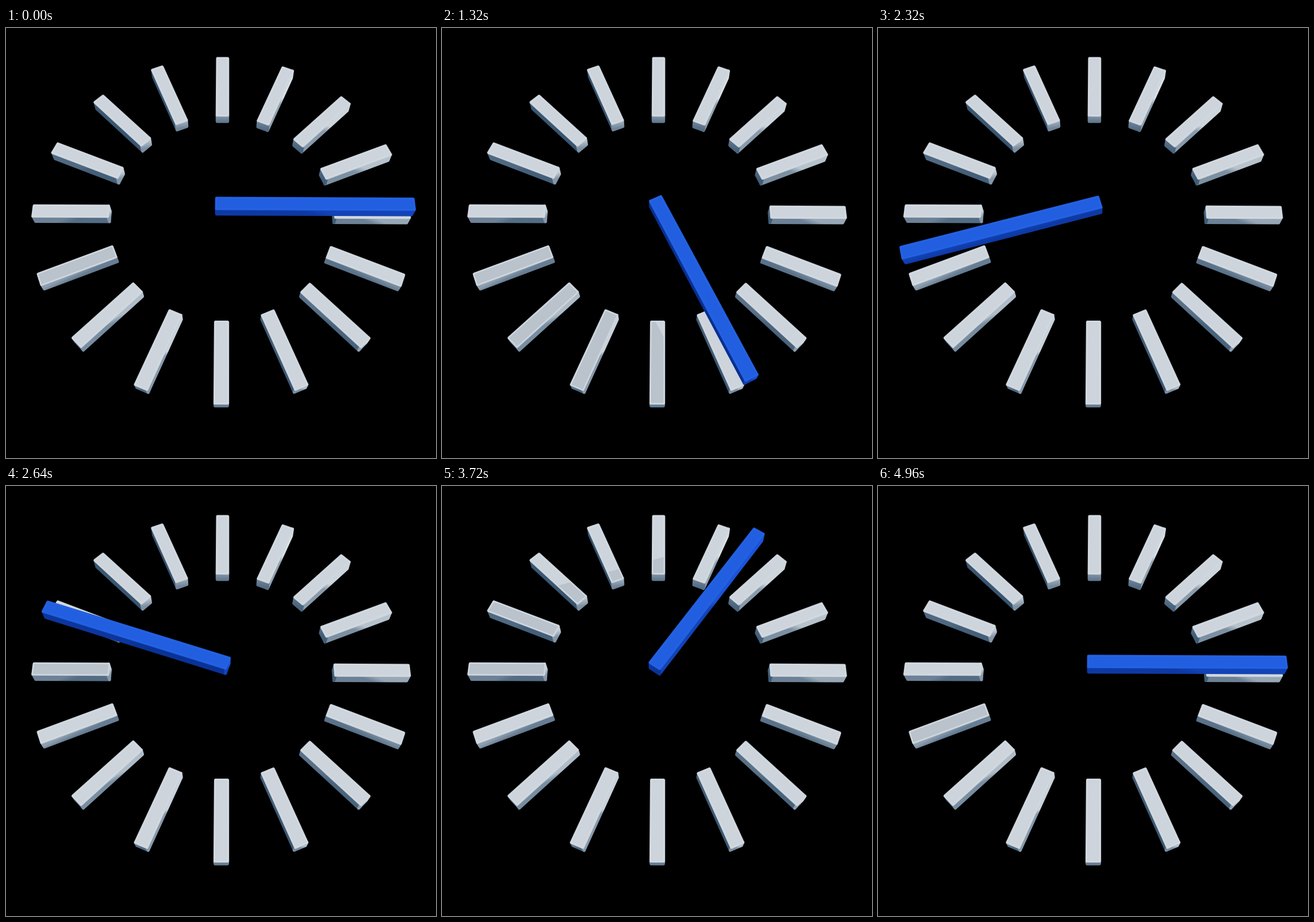
Write an HTML page with a canvas that moves like this. It is 748 px wide and 748 px high and loops after 5000 ms.

```html
<!DOCTYPE html>
<html>
<head>
<meta charset="utf-8">
<style>
  html, body { margin: 0; background: #000; overflow: hidden; }
  canvas { display: block; }
</style>
</head>
<body>
<canvas id="stage" width="748" height="748"></canvas>
<script>
const ctx = document.getElementById('stage').getContext('2d');
const LOOP = 5000, STEP = 40, HALF_WIDTH = 12.4, BEVEL = 2.5, ROLL = 0.004;
const WHITE = { top: [205, 212, 219], dark: [54, 83, 111], light: [217, 224, 230], edge: 'rgba(226,232,238,.45)' };
const BLUE = { top: [33, 95, 224], dark: [8, 46, 142], light: [29, 88, 224], edge: 'rgba(60,115,240,.3)' };

// Tilted perspective camera; z = 0 is the top of the dial bars, z = -1 the floor.
function project([x, y, z]) {
  const depth = 1 + 0.00034 * y + 0.000014 * x - 0.0155 * z;
  const sx = x / depth, sy = -(0.907 * y + 9.5 * z) / depth;
  return [375.8 + sx - sy * ROLL, 319.5 + sy + sx * ROLL];
}

const rgb = c => `rgb(${c.map(Math.round)})`;
const mix = (a, b, t) => a.map((v, i) => v + (b[i] - v) * t);
const middle = (a, b) => [(a[0] + b[0]) / 2, (a[1] + b[1]) / 2];

function trace(points) {
  ctx.beginPath();
  points.forEach(p => ctx.lineTo(...p));
  ctx.closePath();
}

function paint(points, style) {
  trace(points);
  ctx.fillStyle = ctx.strokeStyle = style;
  ctx.lineWidth = 2 * BEVEL;
  ctx.fill();
  ctx.stroke();
}

function area([a, b, c]) {
  return (b[0] - a[0]) * (c[1] - a[1]) - (b[1] - a[1]) * (c[0] - a[0]);
}

// Draws a radial bar and returns the outline of its top face.
function drawBar(angle, inner, outer, zTop, zBottom, skin) {
  const c = Math.cos(angle), s = Math.sin(angle), w = HALF_WIDTH - BEVEL;
  const corners = [[inner + BEVEL, -w], [outer - BEVEL, -w], [outer - BEVEL, w], [inner + BEVEL, w]]
    .map(([r, q]) => [r * c - q * s, r * s + q * c]);
  const level = z => corners.map(([x, y]) => project([x, y, z]));
  const top = level(zTop), bottom = level(zBottom);

  for (let i = 0; i < 4; i++) {
    const j = (i + 1) % 4;
    const face = [top[i], bottom[i], bottom[j], top[j]];
    if (area(face) >= 0) continue;
    const facing = angle + (i - 1) * Math.PI / 2;
    const side = 0.5 + 0.5 * Math.cos(facing) + 0.0005 * corners[i][0];
    const tone = mix(skin.dark, skin.light, Math.min(1, Math.max(0, side)));
    const shade = ctx.createLinearGradient(...middle(top[i], top[j]), ...middle(bottom[i], bottom[j]));
    shade.addColorStop(0, rgb(tone));
    shade.addColorStop(1, rgb(mix(tone, skin.dark, 0.45)));
    paint(face, shade);
  }
  paint(top, rgb(skin.top));
  trace(top);
  ctx.strokeStyle = skin.edge;
  ctx.lineWidth = 1;
  ctx.stroke();
  return top;
}

// The light comes from the right, so the hand's shade sweeps to the left.
function shadeTops(tops, angle) {
  const at = r => project([r * Math.cos(angle), r * Math.sin(angle), 1.4]);
  const slide = ([x, y], d) => [x - d, y + 0.27 * d];
  const pivot = at(-12), tip = at(330);
  ctx.save();
  ctx.beginPath();
  for (const top of tops) {
    top.forEach((p, i) => i ? ctx.lineTo(...p) : ctx.moveTo(...p));
    ctx.closePath();
  }
  ctx.clip();
  trace([slide(pivot, 100), slide(tip, 100), slide(tip, 900), slide(pivot, 900)]);
  ctx.fillStyle = 'rgba(75,95,120,.15)';
  ctx.fill();
  ctx.restore();
}

function handAngle(time) {
  const u = Math.min(1, (Math.floor(time / STEP) + 0.3) / 124);
  return -2 * Math.PI * u * u * (3 - 2 * u);
}

function draw(now) {
  const angle = handAngle(now % LOOP);
  ctx.fillStyle = '#000';
  ctx.fillRect(0, 0, 748, 748);
  ctx.lineJoin = 'round';
  const tops = [];
  for (let i = 0; i < 16; i++) tops.push(drawBar(i * Math.PI / 8, 195, 329, 0, -1, WHITE));
  shadeTops(tops, angle);
  drawBar(angle, -12, 330, 1.47, 0.5, BLUE);
}

const start = performance.now();
function tick() {
  draw(performance.now() - start);
  requestAnimationFrame(tick);
}
tick();
</script>
</body>
</html>
```
